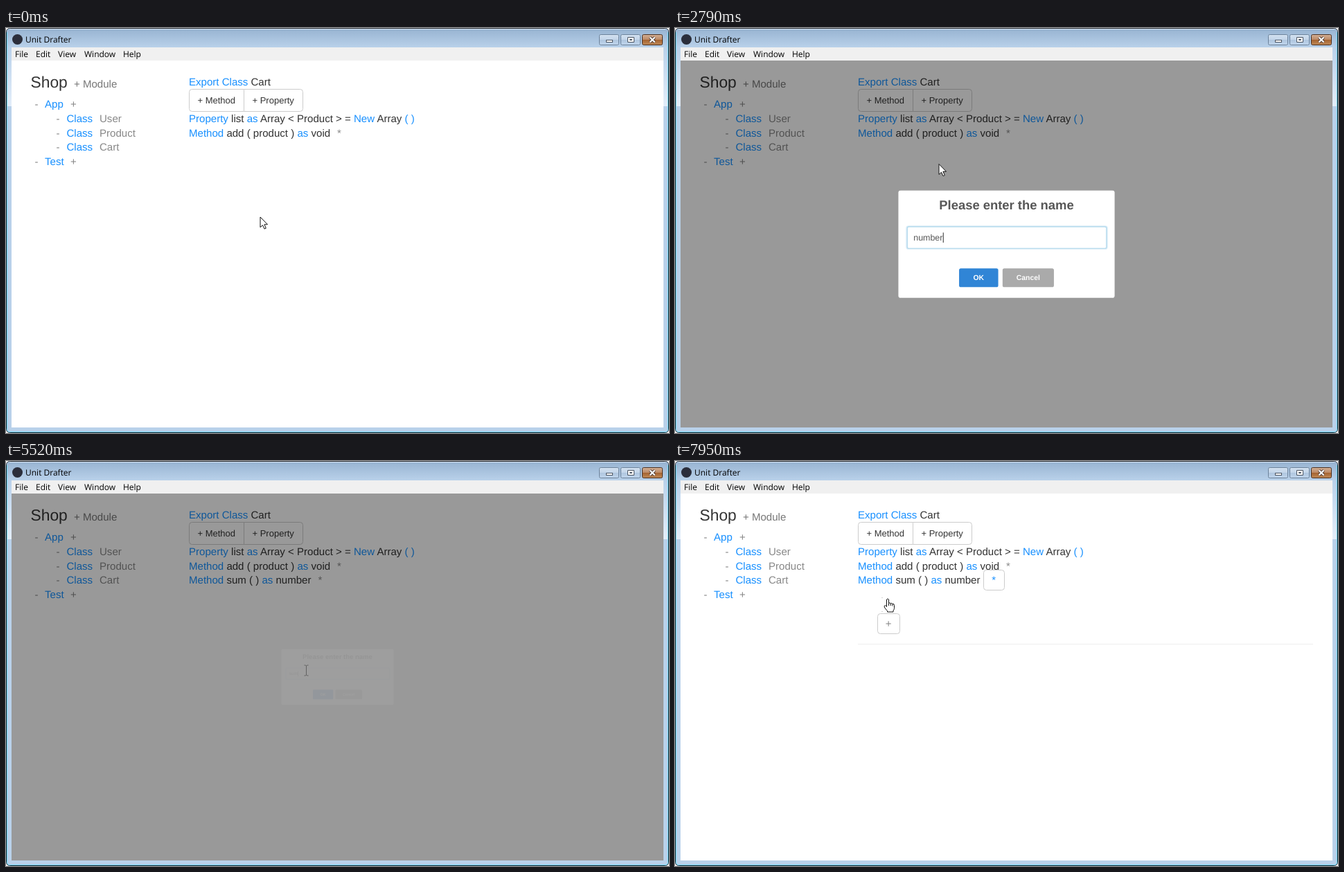
Animation, 957 px wide and 585 px high, one loop 8 s. Source, as an HTML page:

```html
<!DOCTYPE html>
<html lang="en">
<head>
<meta charset="utf-8">
<title>Unit Drafter</title>
<style>
  html, body { margin: 0; width: 100%; height: 100%; overflow: hidden; background: #fff; }
  svg { display: block; width: 957px; height: 585px; }
  text { font: 15.05px "Liberation Sans", Arial, sans-serif; fill: #333; white-space: pre; text-rendering: geometricPrecision; }
  .ui text { font: 12px "Open Sans", "Noto Sans", sans-serif; fill: #000; }
  .key { fill: #1890ff; }
  .soft { fill: #888; }
  .btn { fill: #fff; stroke: #ccc; }
  text.label { font-size: 13px; }
  text.bold { font-weight: bold; text-anchor: middle; }
  #beam { mix-blend-mode: difference; }
</style>
</head>
<body>
<svg viewBox="0 0 957 585">
  <defs>
    <linearGradient id="bar" x2="0" y2="1"><stop stop-color="#97b3d1"/><stop offset="1" stop-color="#b9d1ea"/></linearGradient>
    <linearGradient id="side" x2="0" y2="1"><stop stop-color="#b9d1ea"/><stop offset="1" stop-color="#e4eefa"/></linearGradient>
    <linearGradient id="blue" x2="0" y2="1"><stop stop-color="#d3e1f0"/><stop offset=".48" stop-color="#c3d5e9"/><stop offset=".5" stop-color="#afc6df"/><stop offset="1" stop-color="#c0d5ec"/></linearGradient>
    <linearGradient id="brown" x2="0" y2="1"><stop stop-color="#d2b096"/><stop offset=".48" stop-color="#bd8a66"/><stop offset=".5" stop-color="#a4622f"/><stop offset="1" stop-color="#c08a58"/></linearGradient>
    <linearGradient id="glow" x2="0" y2="1"><stop stop-color="#f3f8fe"/><stop offset="1" stop-color="#dcebfc"/></linearGradient>
  </defs>

  <!-- window -->
  <g class="ui">
    <rect width="957" height="585" fill="#fff"/>
    <rect x=".5" y=".5" width="956" height="584" rx="5" fill="#b9d1ea" stroke="#1e252d"/>
    <path d="M1 28V6Q1 1 6 1H951Q956 1 956 6V28z" fill="url(#bar)"/>
    <path d="M5 1.5H952" stroke="#dce8f5"/>
    <path d="M1 28H8V113H1zM949 28H956V113H949z" fill="url(#side)"/>
    <path d="M1.5 6V579Q1.5 583.5 6 583.5H951Q955.5 583.5 955.5 579V6" fill="none" stroke="#6cd8f7"/>
    <rect x="8" y="28" width="941" height="19" fill="#f0f0f0"/>
    <rect x="8" y="47" width="941" height="530" fill="#fff"/>
    <circle cx="16.5" cy="16.5" r="7.5" fill="#2b2e3b"/>
    <text x="28" y="21">Unit Drafter</text>
    <text x="13" y="42">File</text><text x="43" y="42">Edit</text><text x="75" y="42">View</text>
    <text x="113" y="42">Window</text><text x="169" y="42">Help</text>
    <g stroke="#6c829b">
      <rect x="856.5" y="9.5" width="28" height="15" rx="2" fill="url(#blue)"/>
      <rect x="887.5" y="9.5" width="28" height="15" rx="2" fill="url(#blue)"/>
      <rect x="918.5" y="9.5" width="29" height="15" rx="2" fill="url(#brown)" stroke="#4d3222"/>
    </g>
    <g fill="#fff" stroke="#4b5563">
      <rect x="866.5" y="17.5" width="9" height="3"/>
      <path d="M897.5 13.5H906.5V20.5H897.5zM900.5 16.5V17.5H903.5V16.5z" fill-rule="evenodd"/>
    </g>
    <path d="M929.5 13.5L936.5 20.5M936.5 13.5L929.5 20.5" stroke="#4b3a35" stroke-width="4"/>
    <path d="M929.5 13.5L936.5 20.5M936.5 13.5L929.5 20.5" stroke="#fff" stroke-width="2.2"/>
  </g>

  <!-- module tree -->
  <text x="35.5" y="85.7" style="font-size:22.8px">Shop</text>
  <text x="98" y="86" style="fill:#777">+ Module</text>
  <g id="tree"></g>

  <!-- class editor -->
  <text x="264" y="83"><tspan class="key">Export Class</tspan> Cart</text>
  <path class="btn" id="methodBtn" d="M343.5 88.5H268.5Q264.5 88.5 264.5 92.5V116.5Q264.5 120.5 268.5 120.5H343.5z"/>
  <path class="btn" d="M343.5 88.5H424.5Q428.5 88.5 428.5 92.5V116.5Q428.5 120.5 424.5 120.5H343.5z"/>
  <text class="label" x="276.5" y="109">+ Method</text>
  <text class="label" x="355.5" y="109">+ Property</text>
  <text x="264" y="136"><tspan class="key">Property</tspan> list <tspan class="key">as</tspan> Array &lt; Product &gt; = <tspan class="key">New</tspan> Array <tspan class="key">( )</tspan></text>
  <text x="264" y="157"><tspan class="key">Method</tspan> add ( product ) <tspan class="key">as</tspan> void</text>
  <text class="soft" x="478" y="157">*</text>
  <g id="sumLine">
    <text x="264" y="177"><tspan class="key">Method</tspan> sum ( ) <tspan class="key">as</tspan> number</text>
    <text id="star" class="soft" x="450.5" y="177">*</text>
    <g id="starBtn">
      <rect class="btn" x="445.5" y="157.5" width="30" height="29" rx="4"/>
      <text class="key" x="457.3" y="177">*</text>
    </g>
  </g>
  <g id="body">
    <path id="rows" d="M298.5 197.5h1M298.5 217.5h1" stroke="#aaa"/>
    <g id="tail">
      <path d="M264 222.5H921" stroke="#eee"/>
      <text id="plus" class="soft" x="297" y="198">+</text>
      <g id="plusBtn">
        <rect class="btn" x="292.5" y="178.5" width="32" height="29" rx="4"/>
        <text class="soft" x="303.8" y="198">+</text>
      </g>
    </g>
  </g>

  <!-- type menu -->
  <g id="menu" class="ui">
    <path d="M298 253.5H388.5V104" fill="none" stroke="#8c8c8c" stroke-width="3" stroke-opacity=".8"/>
    <rect x="294.5" y="100.5" width="93" height="152" fill="#fff" stroke="#a5a5a5"/>
    <rect id="hot" x="296.5" width="89" height="22" rx="2.5" fill="url(#glow)" stroke="#aecff7"/>
    <g id="items"></g>
    <path d="M296 199.5H386" stroke="#e0e0e0"/>
    <path d="M375 235V242L379.5 238.5z" fill="#333"/>
  </g>

  <!-- name prompt -->
  <rect id="shade" x="8" y="47" width="941" height="530"/>
  <g id="dialog">
    <rect x="328" y="237.5" width="301" height="149.5" rx="3" fill="#fff"/>
    <text class="bold" x="478.5" y="264" style="font-size:17.75px;fill:#575757">Please enter the name</text>
    <rect x="339.5" y="287.5" width="279" height="31" rx="2.5" fill="none" stroke="#d5eaf6" stroke-width="2"/>
    <rect x="340.5" y="288" width="277" height="30" rx="2" fill="#fff" stroke="#b0d8ec"/>
    <rect id="pick" x="349" y="296" width="41" height="14" fill="#3390ff"/>
    <text id="entry" x="349" y="307" style="font-size:12px"></text>
    <path id="caret" d="M0 296V310" stroke="#333"/>
    <rect x="412.5" y="346" width="54.5" height="26" rx="2.5" fill="#3085d6"/>
    <rect x="473" y="346" width="71.5" height="26" rx="2.5" fill="#aaa"/>
    <text class="bold" x="439.7" y="362" style="font-size:10px;fill:#fff">OK</text>
    <text class="bold" x="508.7" y="362" style="font-size:10px;fill:#fff">Cancel</text>
  </g>

  <!-- pointers, each with its hot spot at 0,0 -->
  <path id="arrow" d="M.5 .5V15.5L4 12.3L6.5 17.7L8.8 16.7L6.4 11.3H11z" fill="#fff" stroke="#111" stroke-linejoin="round"/>
  <g id="hand" stroke-linejoin="round">
    <path d="M-1.5 12V1.5Q0 -.5 1.5 1.5V7Q3 5.5 4.3 7.3Q6 6.2 7 8Q9.5 7.3 9.5 10V14Q9.5 16 8 17.5V19.5H-.5V18Q-3 15.5 -4.8 12.5Q-5.3 10 -3.3 10Q-2.3 10.5 -1.5 12z" fill="#fff" stroke="#111"/>
    <path d="M1.5 7V10.5M4.3 7.5V10.5M7 8.5V11" stroke="#111"/>
  </g>
  <path id="beam" d="M-3 -7.5H-1L0 -6.5L1 -7.5H3M0 -6.5V6.5M-3 7.5H-1L0 6.5L1 7.5H3" fill="none" stroke="#fff"/>
</svg>

<script>
const LOOP = 8000;
const $ = id => document.getElementById(id);
const show = (id, on) => { $(id).style.display = on ? '' : 'none'; };
const last = (table, t) => table.reduce((found, row) => row[0] <= t ? row : found, table[0]);

$('tree').innerHTML = [
  ['App'], ['User', 1], ['Product', 1], ['Cart', 1], ['Test']
].map(([name, nested], i) => {
  const y = Math.round(115.2 + i * 20.7);
  const x = nested ? 72.5 : 41.5;
  const dash = `<text class="soft" x="${x}" y="${y}">-</text>`;
  return dash + (nested
    ? `<text class="key" x="87.5" y="${y}">Class</text><text class="soft" x="135" y="${y}">${name}</text>`
    : `<text class="key" x="56" y="${y}">${name}</text><text class="soft" x="93" y="${y}">+</text>`);
}).join('');

$('items').innerHTML = ['boolean', 'number', 'string', 'void', 'Module', 'Type']
  .map((name, i) => `<text x="319" y="${Math.round(120 + i * 22.6 + (i > 3 ? 10 : 0))}">${name}</text>`)
  .join('');

// pointer, first step, last step, step count, goal x, goal y
const MOVES = [
  ['arrow', 0, 0, 1, 366.5, 272.5],
  ['arrow', 530, 850, 5, 312, 130],
  ['hand', 920, 1080, 3, 296, 102],
  ['arrow', 1390, 1390, 1, 295, 101],
  ['arrow', 1940, 1940, 1, 296, 102],
  ['arrow', 2020, 2170, 3, 345, 153],
  ['arrow', 2330, 2570, 4, 362, 136],
  ['arrow', 2720, 2790, 2, 380.5, 196],
  ['arrow', 2870, 2950, 2, 391, 270],
  ['beam', 3030, 3030, 1, 394, 298],
  ['beam', 3190, 3280, 2, 439, 305],
  ['beam', 3430, 3600, 3, 433.5, 302.5],
  ['arrow', 5600, 5600, 1, 432, 302],
  ['arrow', 5760, 5840, 2, 451, 305],
  ['arrow', 6000, 6390, 6, 443, 182],
  ['hand', 6460, 6460, 1, 450, 173],
  ['hand', 6540, 6620, 2, 455, 158],
  ['hand', 6860, 6860, 1, 448, 155],
  ['hand', 7020, 7020, 1, 445, 167],
  ['arrow', 7250, 7640, 6, 325, 196],
  ['hand', 7720, 7950, 4, 307, 198.5]
];

// time, opacity
const MENU = [[0, 0], [1390, .3], [1470, .75], [1550, 1], [2720, 0]];
const SHADE = [[0, 0], [2720, .22], [2790, .4], [5600, 0]];
// time, scale, opacity
const DIALOG = [
  [0, 1, 0], [2720, .85, .55], [2790, 1.037, 1], [2870, .965, 1], [2950, .985, 1],
  [3030, 1, 1], [5440, .81, .63], [5520, .538, .05], [5600, 1, 0]
];
// time, text, caret x
const ENTRY = [[0, 'number', 390.5], [4130, 's', 355.5], [4360, 'su', 362.5], [4660, 'sum', 372.5]];

function pointerAt(t) {
  let x = 0, y = 0, kind = 'arrow';
  for (const [shape, from, to, count, goalX, goalY] of MOVES) {
    if (t < from) break;
    const u = to > from ? Math.min(1, (t - from) / (to - from)) : 1;
    const p = (Math.floor(u * (count - 1) + .05) + 1) / count;
    x += (goalX - x) * p;
    y += (goalY - y) * p;
    kind = shape;
  }
  return { x, y, kind };
}

function draw(t) {
  const { x, y, kind } = pointerAt(t);
  for (const id of ['arrow', 'hand', 'beam']) show(id, id === kind);
  $(kind).setAttribute('transform', `translate(${x} ${y})`);

  $('methodBtn').style.fill = t >= 920 && t < 1390 ? '#e6e6e6' : '';

  $('menu').style.opacity = last(MENU, t)[1];
  const row = Math.floor((y - 104) / 22.6);
  show('hot', t >= 1940 && row >= 0);
  $('hot').setAttribute('y', Math.floor(104 + row * 22.6) + .5);

  const [, scale, alpha] = last(DIALOG, t);
  $('shade').style.opacity = last(SHADE, t)[1];
  $('dialog').style.opacity = alpha;
  $('dialog').setAttribute('transform', `translate(478.5 312) scale(${scale}) translate(-478.5 -312)`);

  const [, word, caretX] = last(ENTRY, t);
  const picked = t >= 3510 && t < 4130;
  $('entry').textContent = word;
  $('entry').style.fill = picked ? '#fff' : '#575757';
  $('caret').setAttribute('transform', `translate(${caretX} 0)`);
  show('caret', !picked);
  show('pick', picked);

  const starHot = t >= 6540, plusHot = t >= 7720, grown = t >= 7870;
  show('sumLine', t >= 5440);
  show('star', !starHot);
  show('starBtn', starHot);
  show('body', t >= 7020);
  show('plus', !plusHot);
  show('plusBtn', plusHot);
  show('rows', grown);
  $('tail').setAttribute('transform', `translate(0 ${grown ? 42 : 0})`);
}

const start = performance.now();
function tick() {
  draw((performance.now() - start) % LOOP);
  requestAnimationFrame(tick);
}
tick();
</script>
</body>
</html>
```
